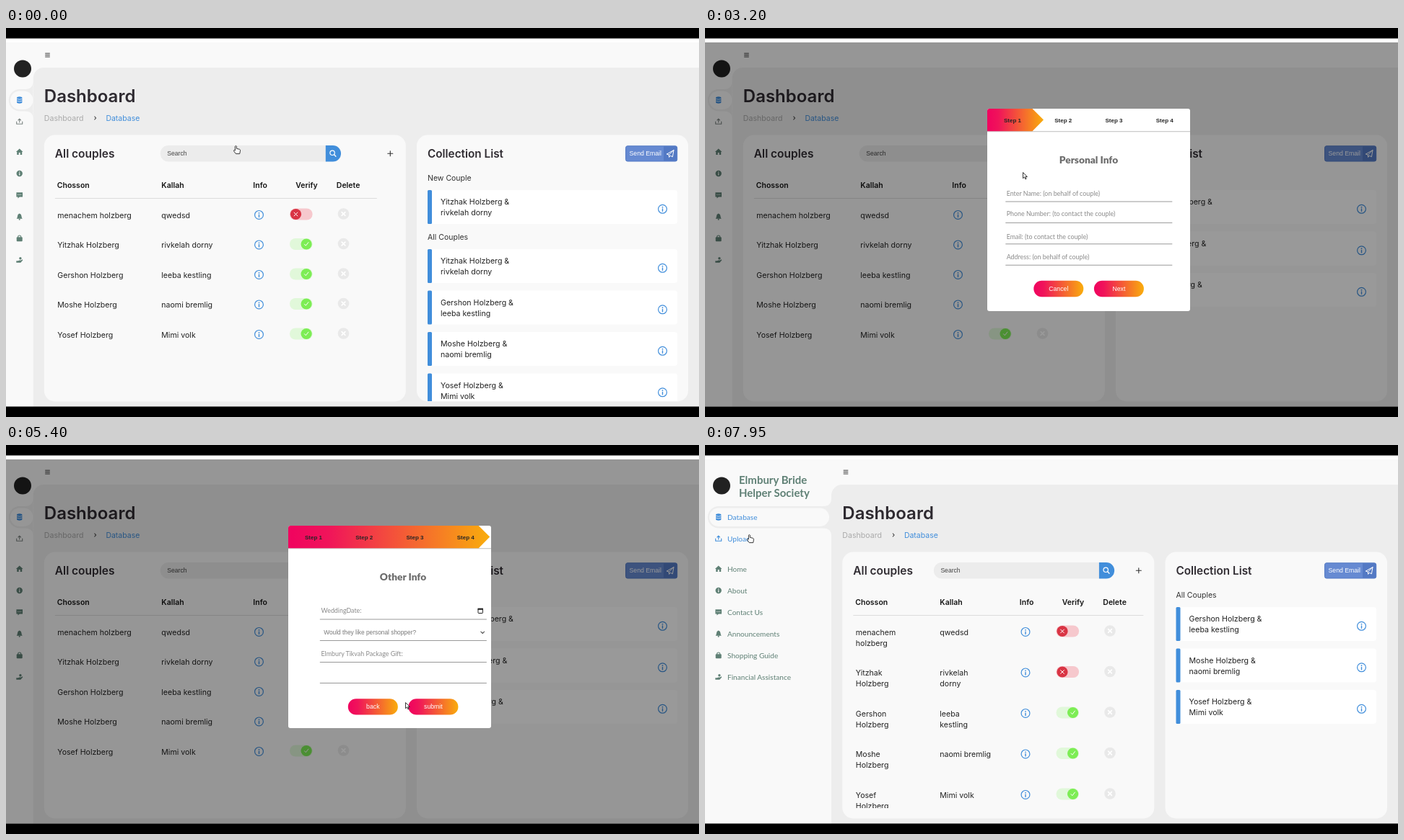
Recreate the animation shown at these times as an HTML page. Size 960x540 px, loop 8 s.

```html
<!DOCTYPE html>
<html lang="en">
<head>
<meta charset="utf-8">
<title>Dashboard</title>
<style>
html, body { margin: 0; width: 100%; height: 100%; overflow: hidden; background: #000; }
svg { display: block; }
text { font-family: Inter, sans-serif; white-space: pre; }
.lato { font-family: Lato, sans-serif; }
.arial { font-family: "Liberation Sans", Arial, sans-serif; }
.semi { font-weight: 600; }
.bold { font-weight: 700; }
.heavy { font-weight: 900; }
.mid { text-anchor: middle; }
</style>
</head>
<body>
<svg id="stage" width="960" height="540" viewBox="0 0 960 540"></svg>
<script>
const LOOP = 8000;
const BLUE = '#418edb', GREEN = '#5f8075', GREY = '#ededed', PALE = '#f9f9f9', RED = '#d93444';
const stage = document.getElementById('stage');

const couples = [
  ['menachem holzberg', 'qwedsd'],
  ['Yitzhak Holzberg', 'rivkelah dorny'],
  ['Gershon Holzberg', 'leeba kestling'],
  ['Moshe Holzberg', 'naomi bremlig'],
  ['Yosef Holzberg', 'Mimi volk']
];
// row, enter, leave
const hovers = [[0, 330, 390], [1, 390, 1725], [0, 1725, 1900]];
const slides = [3954, 4566, 5178];
const tips = [469, 539.5, 610, 691];
// time, x, y
const path = [
  [200, 320, 169], [450, 408, 303], [1350, 408, 303], [1750, 480, 280], [2150, 518, 200],
  [2200, 518, 200], [2550, 533, 178], [2850, 533, 178], [3200, 443, 205], [3500, 478, 305],
  [3800, 478, 305], [3950, 570, 359], [5180, 570, 359], [5400, 556, 362], [5500, 555, 362],
  [5800, 234, 133], [7100, 234, 133], [7400, 28, 112], [7700, 36, 118], [7950, 63, 130]
];

const part = (t, start, span) => Math.min(1, Math.max(0, (t - start) / span));
const mix = (a, b, k) => a + (b - a) * k;
const smooth = u => u * u * (3 - 2 * u);
const easeOut = u => 1 - (1 - u) ** 2;

const text = (x, y, s, size, fill, cls = '') =>
  `<text x="${x}" y="${y}" font-size="${size}" fill="${fill}" class="${cls}">${s.replace(/&/g, '&amp;')}</text>`;
const rect = (x, y, w, h, fill, r = 0, more = '') =>
  `<rect x="${x}" y="${y}" width="${w}" height="${h}" rx="${r}" fill="${fill}" ${more}/>`;
const circle = (x, y, r, fill, more = '') => `<circle cx="${x}" cy="${y}" r="${r}" fill="${fill}" ${more}/>`;
const line = (d, color, w = 1) =>
  `<path d="${d}" fill="none" stroke="${color}" stroke-width="${w}" stroke-linecap="round" stroke-linejoin="round"/>`;
const at = (x, y, s) => `<g transform="translate(${x} ${y})">${s}</g>`;
const clip = (id, x, y, w, h, r = 0) => `<clipPath id="${id}">${rect(x, y, w, h, '#000', r)}</clipPath>`;
const cross = (r, w = 1.3) => line(`M${-r} ${-r}L${r} ${r}M${r} ${-r}L${-r} ${r}`, '#fff', w);

const info = (x, y) => at(x, y,
  circle(0, 0, 5.9, 'none', `stroke="${BLUE}" stroke-width="1.2"`) +
  circle(0, -2.6, .9, BLUE) + line('M0-.3V3', BLUE, 1.4));

const navIcons = [
  c => `<path d="M-3.7-3q0-1.7 3.7-1.7T3.7-3V3q0 1.7-3.7 1.7T-3.7 3Z" fill="${c}"/>` +
    line('M-3.7-1.6q3.7 1.8 7.4 0M-3.7 1.2q3.7 1.8 7.4 0', PALE, .8),
  c => line('M-4 0V3.2H4V0M0 1V-3.6M-1.8-2L0-3.8 1.8-2', c, 1.1),
  c => `<path d="M0-4.5L4.8 0H3.5V4H1V1H-1V4H-3.5V0H-4.8Z" fill="${c}"/>`,
  c => circle(0, 0, 4.2, c) + line('M0-.2V2', PALE, 1.2) + circle(0, -2, .7, PALE),
  c => `<path d="M-4.3-3.8H4.3V2.4H0L-2.2 4.6V2.4H-4.3Z" fill="${c}"/>` +
    [-2, 0, 2].map(x => circle(x, -.7, .6, PALE)).join(''),
  c => `<path d="M-4 2.8Q-2.8 1.6-2.8-.8-2.6-3.6 0-4.4 2.6-3.6 2.8-.8 2.8 1.6 4 2.8Z" fill="${c}"/>` + circle(0, 3.7, 1, c),
  c => rect(-4, -1.8, 8, 6, c, 1) + line('M-2-1.5V-2.5Q-2-4 0-4T2-2.5V-1.5', c, 1.1),
  c => `<path d="M-4.4 1.2H-2L0 .4H2L4.2-.8 4.6.2 1.6 3.8H-4.4Z" fill="${c}"/>` + circle(1.2, -2.2, 1.7, c)
];
const navItems = [['Database', 100], ['Upload', 130], ['Home', 172], ['About', 202], ['Contact Us', 232],
  ['Announcements', 262], ['Shopping Guide', 292], ['Financial Assistance', 322]];

function sidebar(t, s) {
  const color = i => i === 0 || (i === 1 && t >= 7900) ? BLUE : i === 1 ? '#7c8582' : GREEN;
  const labels = navItems.map(([name, y], i) => text(31, y + 3.7, name, 10.1, color(i), 'lato')).join('');
  return rect(0, 20, s, 506, PALE) +
    `<path d="M${s} 74Q${s} 85 ${s - 11} 85H19A15.2 15.2 0 0 0 19 115.4H${s - 11}Q${s} 115.4 ${s} 126Z" fill="${GREY}"/>` +
    rect(6, 87.5, s - 9 + 3 * part(50 - s, 0, 12), 25.4, PALE, 12.7) +
    circle(23, 56.5, 12, '#222') +
    navItems.map(([, y], i) => at(18.7, y, navIcons[i](color(i)))).join('') +
    clip('side', 0, 20, s - 8, 506) +
    `<g clip-path="url(#side)">${labels}` +
    text(47, 53.5, 'Elmbury Bride', 15, GREEN, 'lato bold') +
    text(47, 71.5, 'Helper Society', 15, GREEN, 'lato bold') + '</g>';
}

function toggle(x, y, on, focus) {
  const track = on > .5 ? '#e1f8da' : '#f6c8cd';
  return at(x, y,
    rect(-15.8, -8, 31.6, 16, track, 8, focus ? 'stroke="#111" stroke-width="1.3"' : '') +
    at(mix(-7.3, 7.3, on), 0, on > .5
      ? circle(0, 0, 7.6, '#7ded55') + line('M-2.6.2L-.8 2.2 2.8-2.4', '#fff', 1)
      : circle(0, 0, 7.6, RED) + cross(2.4, 1)));
}

function table(t, x, k) {
  const wrap = k > .5, pitch = wrap ? 56.5 : 41.5;
  const kallah = x + mix(162.5, 135, k), shift = x + mix(0, -44, k);
  const end = x + mix(461, 417, k);
  const names = (px, y, s, split) => split
    ? s.split(' ').map((w, j) => text(px, y + 15 * j, w, 10.6, '#222')).join('')
    : text(px, y, s, 10.6, '#222');
  const head = [['Chosson', x + 18], ['Kallah', kallah], ['Info', shift + 289.5], ['Verify', shift + 348.5], ['Delete', shift + 405]];
  let out = head.map(([s, px]) => text(px, 222, s, 10.5, '#151515', 'semi')).join('') +
    rect(x + 15, 236, end - x - 15, 1, '#ddd') + clip('rows', x, 236, 620, 268) + '<g clip-path="url(#rows)">';
  couples.forEach(([a, b], i) => {
    const y = 259 + pitch * i;
    const mine = hovers.filter(h => h[0] === i);
    if (mine.some(h => t >= h[1] && t < h[2])) out += rect(x + 15, y - 22, end - x - 15, 41, '#ececec');
    const red = mine.reduce((sum, h) => sum + part(t, h[1], 200) - part(t, h[2], 200), 0);
    const on = i === 0 ? 0 : i === 1 ? 1 - part(t, 800, 200) : 1;
    out += names(x + 18.5, y + 4.7, a, wrap) + names(kallah, y + 4.7, b, wrap && b.length > 13) +
      info(shift + 297.7, y + .4) +
      toggle(shift + 356, y - .5, on, i === 1 && t > 800 && t < 2800) +
      at(shift + 414.7, y - 1, circle(0, 0, 7.8, '#e9e9e9') + circle(0, 0, 7.8, RED, `opacity="${red}"`) + cross(2.4, 1.6));
  });
  return out + '</g>';
}

function collection(t, x) {
  const card = ([a, b], y) => rect(x + 15, y, 930 - x - 15, 47, '#fff', 4) + rect(x + 15, y, 6, 47, BLUE, 1.5) +
    text(x + 33, y + 20, a + ' &', 10.6, '#222') + text(x + 33, y + 35.2, b, 10.6, '#222') + info(909.5, y + 26.3);
  const label = (s, y) => text(x + 15, y, s, 10.5, '#333');
  const fresh = t < 1900;
  const top = fresh ? 307 : 225;
  return clip('list', x, 148, 400, 370, 15) + '<g clip-path="url(#list)">' +
    (fresh ? label('New Couple', 212.3) + card(couples[1], 225) : '') + label('All Couples', top - 13) +
    couples.slice(fresh ? 1 : 2).map((c, i) => card(c, top + 57.5 * i)).join('') + '</g>';
}

const search = x => rect(x, 163, 240, 22.5, '#ececec', 11.2) +
  `<path d="M${x + 229} 163h10a11.2 11.2 0 0 1 0 22.5h-10Z" fill="${BLUE}"/>` +
  text(x + 9.5, 177.2, 'Search', 8.6, '#444', 'arial') +
  circle(x + 238.3, 173.3, 3.2, 'none', 'stroke="#fff" stroke-width="1.2"') +
  line(`M${x + 240.8} 175.8l2.3 2.4`, '#fff', 1.3);

const sendButton = rect(858.5, 163.8, 71.2, 21.2, '#668ad2', 2.5, 'stroke="#5379c4"') +
  rect(911, 164.3, 18.2, 20.2, '#5379c4', 1) +
  text(863.5, 177.4, 'Send Email', 8.7, '#fff', 'arial') +
  line('M915.5 175l9.5-5.5-1.6 9.3-3.2-1.6-1.6 2.2-.2-3.2 6.6-6.7M915.5 175l2.9 1.2', '#fff', 1);

function page(t) {
  const k = smooth(part(t, 7280, 450)), s = mix(37.5, 175, k);
  const x = s + 15.3, w = mix(501, 432, k), rx = mix(569, 637.5, k);
  return rect(0, 14, 960, 512, PALE) + rect(0, 14, 960, 6, '#fff') +
    rect(s, 55, 1000, 600, GREY, 15) + sidebar(t, s) +
    [35.2, 37.6, 40].map(y => rect(s + 16.7, y - .5, 6.6, 1, '#333')).join('') +
    text(x, 103, 'Dashboard', 24, '#2e2a30', 'semi') +
    text(x, 129.2, 'Dashboard', 10.6, '#aaa') + line(`M${x + 70} 123l1.8 2-1.8 2`, '#333', 1.1) +
    text(x + 85.6, 129.2, 'Database', 10.5, BLUE) +
    rect(x, 148.5, w, 370, PALE, 15) + rect(rx, 148.5, 945 - rx, 370, PALE, 15) +
    text(x + 15, 179.7, 'All couples', 15.5, '#302c32', 'semi') +
    text(rx + 15, 179.7, 'Collection List', 15.3, '#302c32', 'semi') +
    search(x + mix(161, 126.6, k)) +
    line(`M${x + w - 25} 174.2h7m-3.5-3.5v7`, '#333', 1.1) +
    sendButton + table(t, x, k) + collection(t, rx);
}

const rule = (x, y, w) => rect(x, y - .5, w, 1, '#999');
const chevron = (x, y) => line(`M${x - 2.4} ${y - 1.2}l2.4 2.4 2.4-2.4`, '#555', 1.1);
const field = (x, y, s) => text(x, y, s, 8.9, '#8a8a8a', 'lato');
const choice = (x, y, s) => text(x, y, s, 8.35, '#777', 'arial');
const title = s => text(531.5, 187.7, s, 13.7, '#6c6c6c', 'lato heavy mid');
const buttons = (y, ...names) => names.map((s, i) => rect(455.3 + 83.6 * i, y, 69, 22.4, 'url(#warm)', 11.2) +
  text(489.8 + 83.6 * i, y + 14, s, 8.7, '#fff', 'arial mid')).join('');

const person = who => title(`Enter ${who}'s Info`) + field(418, 233, `${who}'s Full Name:`) + rule(416.3, 241, 231) +
  ['Father', 'Mother'].map((p, i) => {
    const y = 263 + 29.6 * i;
    return choice(421.5, y - .7, 'Title') + chevron(456, y - 2.8) + field(470.7, y, `${who}'s ${p}:`) +
      rule(416.3, y + 8.2, 45.5) + rule(468.8, y + 8.2, 178.5);
  }).join('') +
  choice(421.5, 321.7, `Where is the ${who.toLowerCase()} from?`) + chevron(641, 319.7) + rule(416.3, 330.5, 231) +
  buttons(352.2, 'Back', 'Next');

const forms = [
  title('Personal Info') +
    [['Enter Name: (on behalf of couple)', 233], ['Phone Number: (to contact the couple)', 261.3],
      ['Email: (to contact the couple)', 292.5], ['Address: (on behalf of couple)', 320.8]]
      .map(([s, y], i) => field(417.7, y, s) + rule(416.3, 241 + 29.4 * i, 231)).join('') +
    buttons(350.8, 'Cancel', 'Next'),
  person('Chosson'),
  person('Kallah'),
  title('Other Info') + field(418, 233, 'WeddingDate:') +
    rect(635.5, 227.5, 6.4, 6, 'none', .6, 'stroke="#222"') + rect(635, 226.6, 7.4, 2.2, '#222') +
    choice(421.7, 262.8, 'Would they like personal shopper?') + chevron(641.7, 260.3) +
    field(418, 292.7, 'Elmbury Tikvah Package Gift:') +
    [242, 271.5, 301.5, 330.5].map(y => rule(416.3, y, 231)).join('') +
    buttons(352.2, 'back', 'submit')
];

function modal(t) {
  if (t < 2800 || t >= 6650) return '';
  const gone = t < 4000 ? 1 - part(t, 2800, 250) : part(t, 6400, 250);
  const size = t < 4000 ? easeOut(1 - gone) : (1 - gone) ** 1.9;
  let pos = 0, tip = tips[0];
  slides.forEach((start, i) => {
    const u = part(t, start, 300);
    pos += easeOut(u);
    tip += (tips[i + 1] - tips[i]) * u;
  });
  const pages = forms.map((f, i) => Math.abs(i - pos) < 1 ? at((i - pos) * 281, 0, f) : '').join('');
  const labels = [1, 2, 3, 4].map(n => text(355.7 + 70.25 * n, 130.6, 'Step ' + n, 8, '#252525', 'arial bold mid')).join('');
  return rect(0, 20, 960 * size, 505.5 * size, '#000', 0, 'opacity=".4"') +
    `<g opacity="${1 - gone}" transform="translate(531.5 252.5) scale(${1 + .3 * gone}) translate(-531.5 -252.5)">` +
    clip('box', 391, 112, 281, 281, 3) +
    '<g clip-path="url(#box)">' + rect(391, 112, 281, 281, '#fff') + rect(391, 143, 281, 1.3, '#ccc') +
    `<path d="M391 112H${tip - 15.5}L${tip} 127.6 ${tip - 15.5} 143.3H391Z" fill="url(#warm)"/>` +
    labels + pages + '</g></g>';
}

function cursor(t) {
  let i = path.findIndex(p => p[0] > t);
  if (i < 0) i = path.length - 1;
  const b = path[i], a = path[Math.max(0, i - 1)];
  const u = a === b ? 0 : smooth(part(t, a[0], b[0] - a[0]));
  const hand = t < 2850 || (t > 3900 && t < 5200) || t > 7340;
  const shape = hand
    ? 'M-2.6-4.8q1-1.4 2 0V-1.6L3.4-.7Q4.8-.2 4.5 1.4L3.7 5.6H-1.6L-4.5 1.7Q-4.6.2-3.2.6L-2.6 1.2Z'
    : 'M-2.5-4.5V3.7L-.5 1.9.9 4.9 2.1 4.3.8 1.5H3.4Z';
  return at(mix(a[1], b[1], u), mix(a[2], b[2], u),
    `<path d="${shape}" fill="#fff" stroke="#222" stroke-width=".9" stroke-linejoin="round"/>`);
}

const warm = '<linearGradient id="warm"><stop stop-color="#f0035f"/><stop offset=".2" stop-color="#f0145a"/>' +
  '<stop offset="1" stop-color="#f9ad0c"/></linearGradient>';

function draw(now) {
  const t = now % LOOP;
  stage.innerHTML = warm + page(t) + modal(t) + cursor(t) +
    rect(0, 0, 960, 14.5, '#000') + rect(0, 525.5, 960, 15, '#000');
  requestAnimationFrame(draw);
}
draw(0);
</script>
</body>
</html>
```
